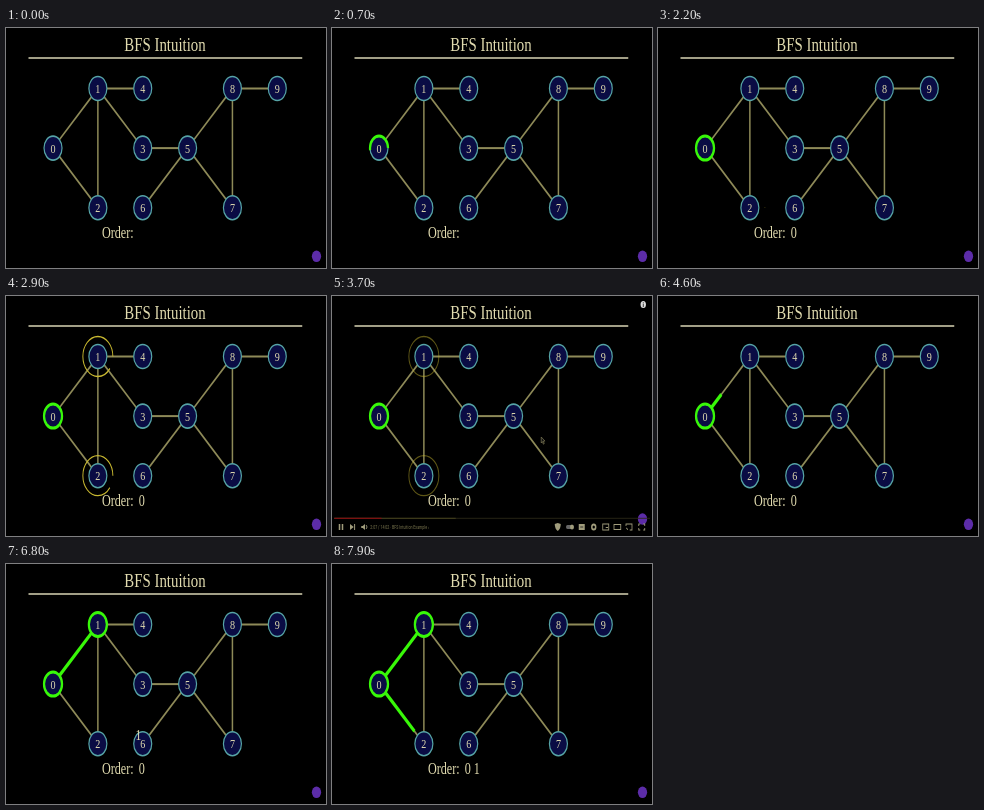
These frames come from a looping animation (320 px wide and 240 px high, 8000 ms). An HTML page:

```html
<!DOCTYPE html>
<html lang="en">
<head>
<meta charset="utf-8">
<title>BFS Intuition</title>
<style>
html, body { margin: 0; width: 100%; height: 100%; overflow: hidden; background: #000; }
svg { display: block; width: 320px; height: 240px; }
text { font-family: "Liberation Serif", "Times New Roman", serif; fill: #e2dcb0; }
.mid { text-anchor: middle; }
.edge { stroke: #8e8a58; stroke-width: 2; }
.node { fill: #0a0c44; stroke: #56a4a6; stroke-width: 1.6; }
.visit { fill: none; stroke: #38f808; stroke-width: 3; }
.visit.wide { stroke-width: 3.8; }
.ring { fill: none; stroke: #c8b830; stroke-width: 1.3; }
#bar text { font: 4.8px Roboto, sans-serif; fill: #7c7850; }
</style>
</head>
<body>
<!-- A 16:9 scene shown on a 4:3 stage -->
<svg id="stage" viewBox="0 0 426.67 240" preserveAspectRatio="none">
  <text class="mid" x="212" y="22.8" font-size="19.8">BFS Intuition</text>
  <path d="M30 30H395" stroke="#d8d4b4" stroke-width="1.6"/>
  <g id="graph"></g>
  <text x="128" y="210" font-size="16.2">Order:</text>
  <g id="marks"></g>
  <ellipse id="badge" cx="414" cy="228.3" rx="6.2" ry="5.8" fill="#5c2ca8"/>
  <g id="bar" fill="#a09c7c">
    <path d="M3 222.3H424" stroke="#2c2a18" stroke-width="1"/>
    <path d="M3 222.3H165" stroke="#4a4620" stroke-width="1"/>
    <path d="M3 222.3H66" stroke="#7c1010" stroke-width="1.2"/>
    <path d="M9 228h2v6h-2zM13 228h2v6h-2zM24 228l5 3-5 3zM29.5 228h1.3v6h-1.3zM39 230h2l3-2v6l-3-2h-2z"/>
    <path d="M45.5 229q2.5 2 0 4" fill="none" stroke="#a09c7c"/>
    <text x="51" y="232.6">2:07 / 14:02 · BFS Intuition Example ›</text>
    <path d="M297 228l4-1 4 1q0 5-4 7-4-2-4-7z"/>
    <rect x="312" y="229" width="10" height="4" rx="2" fill="#666"/>
    <circle cx="320" cy="231" r="2.6"/>
    <path d="M329 228h8v6h-8z"/>
    <path d="M331 231h4" stroke="#222"/>
    <circle cx="349" cy="231" r="2.6" fill="none" stroke="#a09c7c" stroke-width="2"/>
    <g fill="none" stroke="#a09c7c" stroke-width="1.1">
      <path d="M361 228h8v6h-8zM365 231.5h3M376 228.5h9v5h-9zM392 230v-2h8v6h-3M392 232q2 0 2 2"/>
      <path d="M409 230v-2h2M415 228h2v2M417 232v2h-2M411 234h-2v-2"/>
    </g>
    <circle cx="415" cy="8.5" r="3.6" fill="#ddd"/>
    <path d="M415 6.2v1.2M415 8v3" stroke="#222" stroke-width="1.1"/>
    <path d="M279 141v6l1.6-1.4 1.2 2.6 1.2-.6-1.2-2.5h2.2z" fill="#111" stroke="#8c8860" stroke-width=".7"/>
  </g>
</svg>
<script>
const $ = id => document.getElementById(id);
const R = 12, LOOP = 8000;

// Nodes sit on a grid of columns and rows
const nodes = [[0, 1], [1, 0], [1, 2], [2, 1], [2, 0], [3, 1], [2, 2], [4, 2], [4, 0], [5, 0]]
  .map(([c, r]) => [62.7 + 59.8 * c, 60.5 + 59.6 * r]);
const edges = ['01', '02', '12', '13', '14', '35', '56', '58', '57', '78', '89'];

function add(parent, tag, attrs, text = '') {
  const el = document.createElementNS('http://www.w3.org/2000/svg', tag);
  for (const k in attrs) el.setAttribute(k, attrs[k]);
  el.textContent = text;
  return parent.appendChild(el);
}

function edgePath([a, b]) {
  const [x, y] = nodes[a], [u, v] = nodes[b];
  const k = R / Math.hypot(u - x, v - y), dx = (u - x) * k, dy = (v - y) * k;
  return `M${x + dx} ${y + dy}L${u - dx} ${v - dy}`;
}

// Counter-clockwise from the right
function circlePath(n, r) {
  const [x, y] = nodes[n];
  return `M${x + r} ${y}A${r} ${r} 0 1 0 ${x - r} ${y}A${r} ${r} 0 1 0 ${x + r} ${y}`;
}

const sigmoid = x => 1 / (1 + Math.exp(-x));
const low = sigmoid(-5);
function smooth(t, start) {
  const p = Math.min(1, Math.max(0, (t - start) / 1000));
  return (sigmoid(10 * (p - 0.5)) - low) / (1 - 2 * low);
}

const graph = $('graph'), marks = $('marks');
const steps = [];

function trace(parent, cls, d, start) {
  const el = add(parent, 'path', { class: cls, d, pathLength: 1 });
  steps.push(t => el.setAttribute('stroke-dasharray', smooth(t, start) + ' 2'));
  return el;
}

function flyDigit(n, x, start) {
  const [x0, y0] = nodes[n];
  const el = add(marks, 'text', { class: 'mid' }, n);
  steps.push(t => {
    const s = smooth(t, start);
    el.setAttribute('x', x0 + (x - x0) * s);
    el.setAttribute('y', y0 + 4.5 + (205.5 - y0) * s);
    el.setAttribute('font-size', 13.5 + 2.7 * s);
    el.style.display = t < start ? 'none' : '';
  });
}

function circumscribe(n, start) {
  const el = trace(marks, 'ring', circlePath(n, 20), start);
  steps.push(t => el.style.opacity = 1 - smooth(t, start + 1000));
}

for (const e of edges) add(graph, 'path', { class: 'edge', d: edgePath(e) });
trace(graph, 'visit wide', edgePath('01'), 4180);
trace(graph, 'visit wide', edgePath('02'), 7180);
nodes.forEach(([cx, cy], n) => {
  add(graph, 'circle', { class: 'node', cx, cy, r: R });
  add(graph, 'text', { class: 'mid', x: cx, y: cy + 4.5, 'font-size': 13.5 }, n);
});

trace(marks, 'visit', circlePath(0, R), 190);
flyDigit(0, 181, 1190);
circumscribe(1, 2190);
circumscribe(2, 2190);
trace(marks, 'visit', circlePath(1, R), 5180);
flyDigit(1, 193, 6185);

// The player controls pop up and vanish
steps.push(t => {
  const shown = t >= 3695 && t < 4100;
  $('bar').style.display = shown ? '' : 'none';
  $('badge').setAttribute('cy', shown ? 223 : 228.3);
});

function draw() {
  const t = performance.now() % LOOP;
  for (const step of steps) step(t);
  requestAnimationFrame(draw);
}
draw();
</script>
</body>
</html>
```
